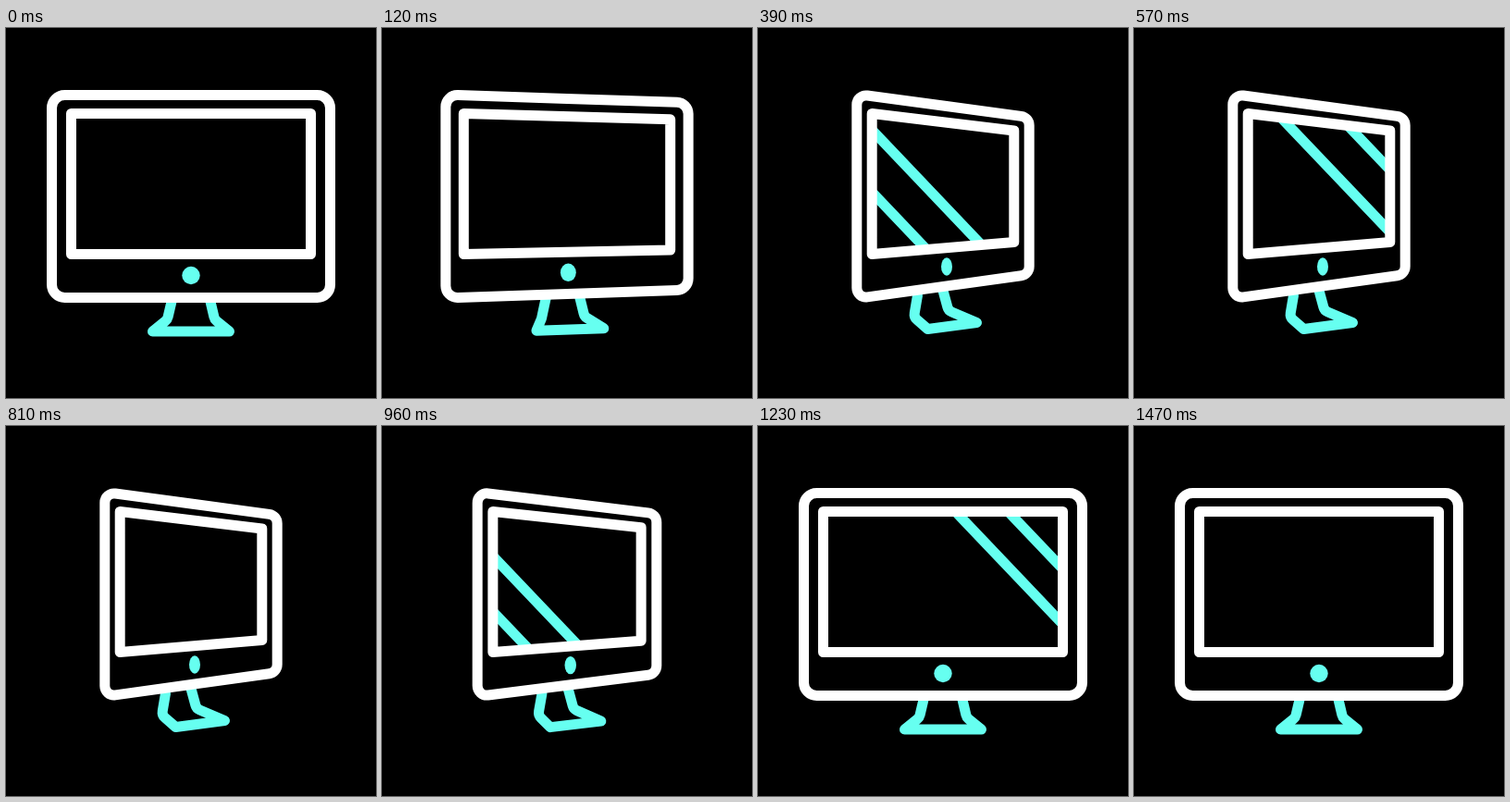
These frames come from a looping animation (400x400 px, 1620 ms). An HTML page with a canvas:

```html
<!DOCTYPE html>
<html lang="en">
<head>
<meta charset="utf-8">
<title>Turning monitor</title>
<style>
  html, body { margin: 0; height: 100%; overflow: hidden; background: #000; }
  canvas { display: block; width: 100vmin; height: 100vmin; }
</style>
</head>
<body>
<canvas width="400" height="400"></canvas>
<script>
const ctx = document.querySelector('canvas').getContext('2d');
const LOOP = 1620, STEP = 30, TURN = 292, FRONT_AGAIN = 1200;
const CENTER = 200, WHITE = '#fff', CYAN = '#66fff0';

const mix = (a, b, k) => a + (b - a) * k;
const easeInOut = x => x < 0.5 ? 2 * x * x : 1 - 2 * (1 - x) ** 2;

// 0 = facing front, 1 = fully turned
function turnAt(t) {
  const x = Math.min(t, FRONT_AGAIN - t) / TURN;
  return easeInOut(Math.max(0, Math.min(1, x)));
}

// Turning narrows a panel, shortens its far (right) edge and grows its near edge.
function panel(k, { half, turnedHalf, top, bottom, drop, rise, grow }) {
  const w = mix(half, turnedHalf, k);
  const left = CENTER - w, right = CENTER + w;
  return [
    [left, top - grow * k], [right, top + drop * k],
    [right, bottom - rise * k], [left, bottom + grow * k]
  ];
}

// Left and right point of the stand at one height.
function standLevel(k, y, half, turnedHalf, shift) {
  const x = CENTER + shift * k, w = mix(half, turnedHalf, k);
  const lift = 6 * k, tilt = 3.5 * k;
  return [[x - w, y - lift + tilt], [x + w, y - lift - tilt]];
}

function polygon(points) {
  ctx.beginPath();
  points.forEach(p => ctx.lineTo(...p));
  ctx.closePath();
}

function roundedPolygon(points, radius) {
  const [a, b] = points;
  ctx.beginPath();
  ctx.moveTo((a[0] + b[0]) / 2, (a[1] + b[1]) / 2);
  for (let i = 1; i <= 4; i++) {
    ctx.arcTo(...points[i % 4], ...points[(i + 1) % 4], radius);
  }
  ctx.closePath();
}

function stroke(color) {
  ctx.strokeStyle = color;
  ctx.stroke();
}

function drawStand(k) {
  const [top1, top2] = standLevel(k, 291.5, 20, 13.5, -14);
  const [knee1, knee2] = standLevel(k, 315, 25.5, 18.7, -12.8);
  const [foot1, foot2] = standLevel(k, 328, 41.5, 26.5, 10);
  ctx.beginPath();
  ctx.moveTo(...top1);
  ctx.arcTo(...knee1, ...foot1, 8);
  ctx.lineTo(...foot1);
  ctx.lineTo(...foot2);
  ctx.arcTo(...knee2, ...top2, 8);
  ctx.lineTo(...top2);
  stroke(CYAN);
}

// Two slanted stripes slow down as they cross; from/to place the trailing one.
function drawGlare(t, { start, end, from, to, gap }) {
  const x = (t - start) / (end - start);
  if (x < 0 || x >= 1) return;
  const trailing = mix(to, from, (1 - x) ** 1.32);
  for (const c of [trailing, trailing + gap]) {
    ctx.beginPath();
    ctx.moveTo(c - 20, 76);
    ctx.lineTo(c + 180, 286);
    stroke(CYAN);
  }
}

function drawDot(k) {
  ctx.beginPath();
  ctx.ellipse(CENTER + 4 * k, 267.5 - 9.5 * k, mix(9.7, 6, k), 9.7, 0, 0, 2 * Math.PI);
  ctx.fillStyle = CYAN;
  ctx.fill();
}

function draw(t) {
  const k = turnAt(t);
  const frame = panel(k, { half: 150.5, turnedHalf: 93.2, top: 72.5, bottom: 291.5, drop: 24, rise: 25, grow: 1 });
  const glass = panel(k, { half: 129.5, turnedHalf: 76.8, top: 92.5, bottom: 244.5, drop: 18.5, rise: 13, grow: 0 });

  ctx.fillStyle = '#000';
  ctx.fillRect(0, 0, 400, 400);
  drawStand(k);

  ctx.save();
  polygon(glass);
  ctx.clip();
  drawGlare(t, { start: 210, end: 810, from: -83, to: 262, gap: 64 });
  drawGlare(t, { start: 840, end: 1470, from: -79, to: 333, gap: 57 });
  ctx.restore();

  roundedPolygon(frame, mix(14, 10, k));
  stroke(WHITE);
  polygon(glass);
  stroke(WHITE);
  drawDot(k);
}

function tick() {
  const t = performance.now() % LOOP;
  draw(Math.floor(t / STEP) * STEP);
  requestAnimationFrame(tick);
}

ctx.lineWidth = 11;
ctx.lineJoin = ctx.lineCap = 'round';
tick();
</script>
</body>
</html>
```
